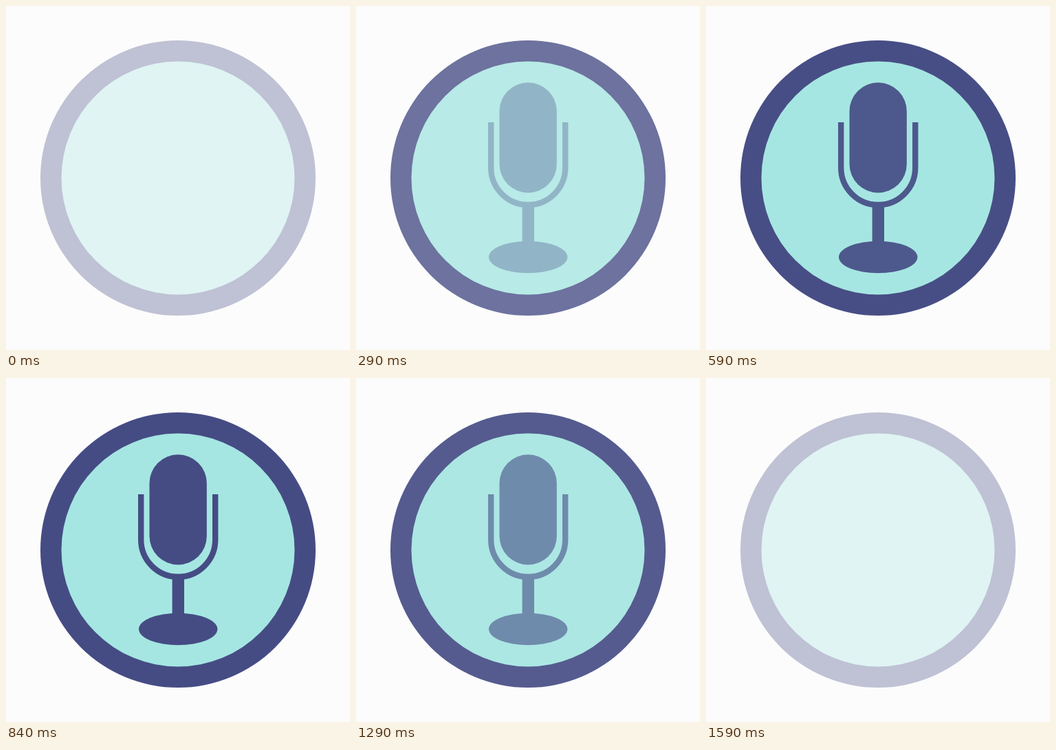
Animation of 500 by 500 pixels, one loop 1790 ms. Source, as an HTML page:

```html
<!DOCTYPE html>
<html lang="en">
<head>
<meta charset="utf-8">
<title>Microphone badge</title>
<style>
  html, body { margin: 0; width: 100%; height: 100%; overflow: hidden; background: #fcfcfc; }
  svg { display: block; width: 100%; height: 100%; }
</style>
</head>
<body>
<svg viewBox="0 0 500 500">
  <g id="badge">
    <circle cx="250" cy="250" r="200" fill="#454c84"/>
    <circle cx="250" cy="250" r="169.5" fill="#a5e6e2"/>
  </g>
  <g id="mic" fill="#454c84">
    <rect x="208.5" y="111.3" width="83.3" height="160.2" rx="41.65"/>
    <path d="M196.2 169V235a54 54 0 0 0 108 0V169" fill="none" stroke="#454c84" stroke-width="8.4"/>
    <rect x="241.6" y="289" width="17.4" height="56"/>
    <ellipse cx="250.2" cy="365" rx="57.2" ry="23.2"/>
  </g>
</svg>
<script>
  const LOOP = 1790;
  const starts = [0, 200, 290, 380, 500, 590, 680, 840, 1080, 1200, 1290, 1410, 1500, 1590];
  const fade = [0.33, 0.587, 0.78, 0.91, 0.965, 0.985, 1, 1];
  const DELAY = 2; // the microphone trails the badge by two steps
  const badge = document.getElementById("badge");
  const mic = document.getElementById("mic");

  function draw(now) {
    const t = now % LOOP;
    const step = starts.findLastIndex(s => s <= t);
    // fade in up to step 7, then back down from step 5
    const level = step < 8 ? step : 13 - step;
    badge.setAttribute("opacity", fade[level]);
    mic.setAttribute("opacity", level === 7 ? 1 : fade[level - DELAY] ?? 0);
  }

  const begin = performance.now();
  function tick() {
    draw(performance.now() - begin);
    requestAnimationFrame(tick);
  }
  tick();
</script>
</body>
</html>
```
